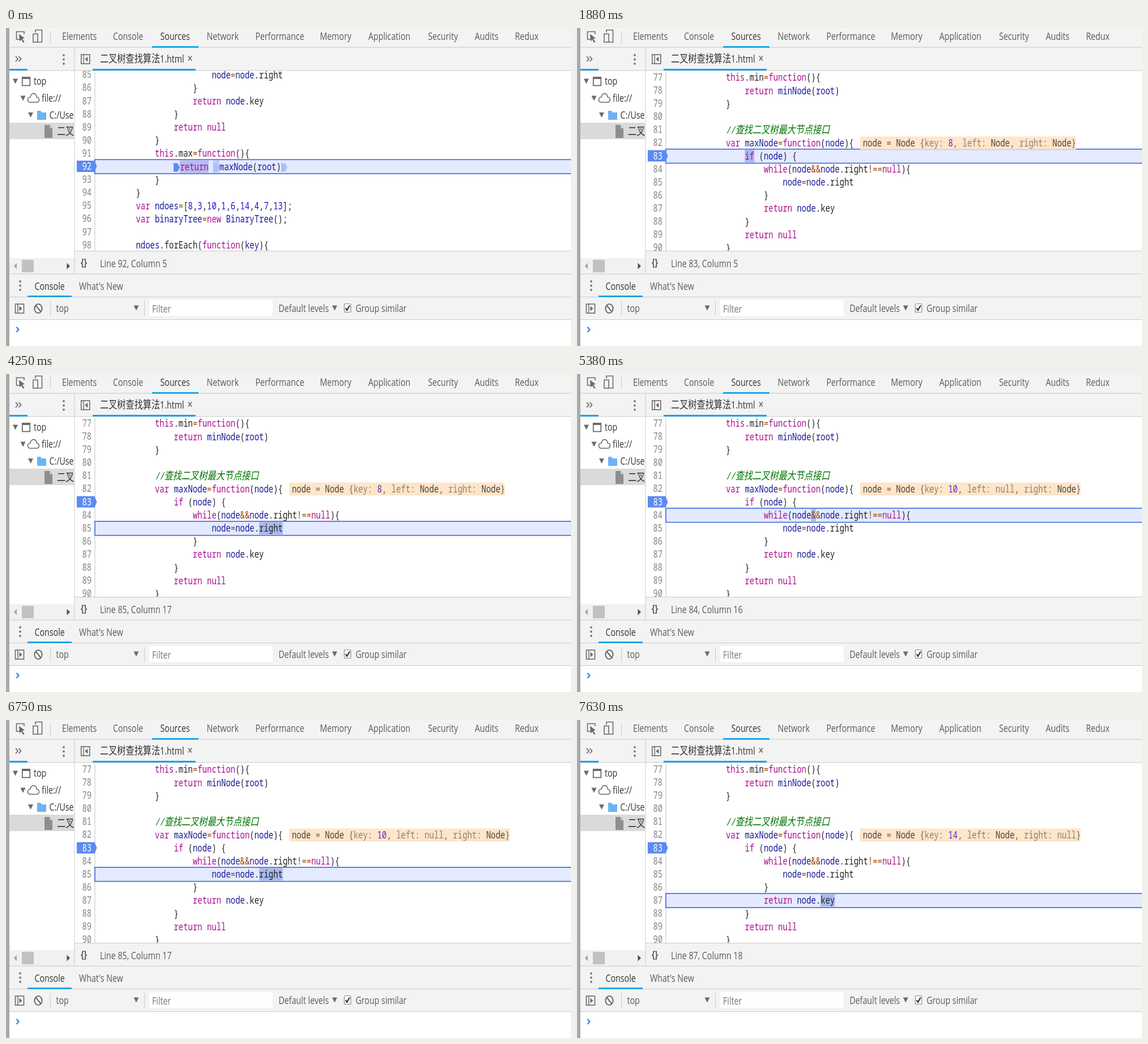
Recreate the animation shown at these times as an HTML page with a canvas. Size 998 by 561 pixels, loop 8000 ms.

```html
<!DOCTYPE html>
<html lang="zh">
<head>
<meta charset="utf-8">
<title>Debugger stepping</title>
<style>
html, body { margin: 0; width: 100%; height: 100%; overflow: hidden; background: #fff; }
canvas { display: block; }
</style>
</head>
<body>
<canvas id="stage" width="998" height="561"></canvas>
<script>
const ctx = document.getElementById('stage').getContext('2d');
const LOOP = 8000;
const ASPECT = 0.79;
const UI = '18px "Open Sans", "Noto Sans", sans-serif';
const CJK = '19.2px "Noto Sans CJK SC", sans-serif';
const MONO = '17.66px "Noto Sans Mono", monospace';
const CHAR = 8.37, ROW = 23.1, CODE_X = 162.5;
const BAR = '#f3f3f3', LINE = '#cacaca', ICON = '#6a6a6a', TEXT = '#5a5a5a';
const ACCENT = '#10a2ee', MARKER = '#5b8bf3', MARKER_PALE = '#a9c1f8';

const FIRST_LINE = 77;
const SOURCE = `            this.min=function(){
                return minNode(root)
            }

            //查找二叉树最大节点接口
            var maxNode=function(node){
                if (node) {
                    while(node&&node.right!==null){
                        node=node.right
                    }
                    return node.key
                }
                return null
            }
            this.max=function(){
                return maxNode(root)
            }
        }
        var ndoes=[8,3,10,1,6,14,4,7,13];
        var binaryTree=new BinaryTree();

        ndoes.forEach(function(key){`.split('\n');

const KEYWORDS = new Set('this function return var if while null new'.split(' '));

// Each step: start, paused line, status column, marked columns, inline value
const atLine92 = { line: 92, column: 5, anchor: 92, anchorY: 244.5, stop: 92 };
const inMax = (line, column, mark, value) =>
  ({ line, column, mark, value, anchor: 83, anchorY: 226, stop: 83 });
const N8 = 'node = Node {key: 8, left: Node, right: Node}';
const N10 = 'node = Node {key: 10, left: null, right: Node}';
const N14 = 'node = Node {key: 14, left: Node, right: null}';
const STEPS = [
  [0, atLine92],
  [1380, { ...atLine92, running: true }],
  [1500, inMax(83, 5, [16, 2])],
  [1630, inMax(83, 5, [16, 2], N8)],
  [3380, inMax(84, 16, [30, 1], N8)],
  [4250, inMax(85, 17, [34, 5], N8)],
  [5380, inMax(84, 16, [30, 1], N10)],
  [6130, inMax(85, 17, [34, 5], N10)],
  [6880, inMax(84, 16, [30, 1], N14)],
  [7630, inMax(87, 18, [32, 3], N14)]
];

function rect(x, y, w, h, color) {
  ctx.fillStyle = color;
  ctx.fillRect(x, y, w, h);
}

function frame(x, y, w, h, color, width = 1.6) {
  ctx.strokeStyle = color;
  ctx.lineWidth = width;
  ctx.strokeRect(x, y, w, h);
}

function path(points, color, stroke, close = true) {
  ctx.beginPath();
  for (let i = 0; i < points.length; i += 2) ctx.lineTo(points[i], points[i + 1]);
  if (close) ctx.closePath();
  if (stroke) {
    ctx.strokeStyle = color;
    ctx.lineWidth = stroke;
    ctx.stroke();
  } else {
    ctx.fillStyle = color;
    ctx.fill();
  }
}

function text(str, x, baseline, color = TEXT, font = UI) {
  ctx.save();
  ctx.translate(x, baseline);
  ctx.scale(ASPECT, 1);
  ctx.font = font;
  ctx.fillStyle = color;
  ctx.fillText(str, 0, 0);
  const width = ctx.measureText(str).width * ASPECT;
  ctx.restore();
  return x + width;
}

function clip(x, y, w, h, draw) {
  ctx.save();
  ctx.beginPath();
  ctx.rect(x, y, w, h);
  ctx.clip();
  draw();
  ctx.restore();
}

function dots(x, y) {
  for (const dy of [-7.5, 0, 7.5]) rect(x - 1.5, y + dy - 1.7, 3, 3.4, ICON);
}

const down = (x, y, color = ICON) => path([x - 4.5, y - 4.5, x + 4.5, y - 4.5, x, y + 4.5], color);

function panelIcon(x, y, dir) {
  frame(x, y, 15, 16, ICON);
  rect(x + 3.6, y, 1.4, 16, ICON);
  const tip = dir > 0 ? 12 : 6.5, back = dir > 0 ? 7 : 11.5;
  path([x + back, y + 3.5, x + back, y + 12.5, x + tip, y + 8], ICON);
}

function drawTopBar() {
  rect(6, 0, 992, 34, BAR);
  rect(6, 33.5, 992, 1.2, LINE);
  path([24, 20, 18.5, 20, 18.5, 6.5, 32, 6.5, 32, 11], ICON, 1.6, false);
  path([23, 10.5, 33, 18, 28.8, 19, 32.5, 24.5, 30.3, 26, 27, 20.5, 24, 23.5], ICON);
  path([52, 8, 52, 3.5, 63.5, 3.5, 63.5, 25, 57, 25], ICON, 1.6, false);
  frame(48, 10.5, 8, 14.5, ICON);
  rect(78, 5, 1, 22, LINE);
  const tabs = [['Elements', 99], ['Console', 189], ['Sources', 272.5], ['Network', 354.5],
    ['Performance', 440.5], ['Memory', 554.5], ['Application', 640], ['Security', 745.5],
    ['Audits', 828], ['Redux', 899]];
  for (const [name, x] of tabs) text(name, x, 21, name === 'Sources' ? '#333' : TEXT);
  rect(258, 32, 82, 2.8, ACCENT);
}

function drawSidebar() {
  rect(6, 35, 115, 40, BAR);
  for (const x of [17, 22.5]) path([x, 50, x + 4, 54.5, x, 59], ICON, 1.8, false);
  dots(102, 55.5);
  rect(6, 74.5, 115, 1, LINE);
  rect(6, 72, 32, 3, ACCENT);
  rect(6, 167, 114, 29, '#dadada');

  clip(6, 76, 114, 330, () => {
    down(16.5, 94);
    frame(28.8, 87, 13.5, 14.5, ICON, 1.8);
    rect(28, 86, 15, 4, ICON);
    text('top', 49, 100, '#333');

    down(30, 124);
    ctx.beginPath();
    ctx.moveTo(43, 131);
    ctx.bezierCurveTo(37, 131, 37, 122, 43, 122);
    ctx.bezierCurveTo(44, 113, 54, 114, 54, 122);
    ctx.bezierCurveTo(60, 122, 60, 131, 54, 131);
    ctx.closePath();
    ctx.strokeStyle = ICON;
    ctx.lineWidth = 1.6;
    ctx.stroke();
    text('file://', 63, 130, '#333');

    down(43.5, 153.5);
    path([55, 146, 61, 146, 63, 149, 71, 149, 71, 162, 55, 162], '#6db2f5');
    text('C:/Use', 76.5, 160, '#333');

    path([68, 171, 77, 171, 82, 177, 82, 194, 68, 194], '#8e8e8e');
    path([77, 171, 82, 177, 77, 177], '#c4c4c4');
    text('二叉树', 90, 189, '#333', CJK);
  });

  rect(6, 406, 115, 28, '#f1f1f1');
  rect(28, 409, 21, 22, '#c1c1c1');
  path([19, 414.5, 19, 425.5, 14, 420], '#a3a3a3');
  path([107.5, 414.5, 107.5, 425.5, 113, 420], '#505050');
}

function drawEditorBars(state) {
  rect(121, 35, 877, 40, BAR);
  rect(121, 74.5, 877, 1, LINE);
  panelIcon(132.8, 47, -1);
  const end = text('二叉树查找算法', 166, 61, '#333', CJK);
  text('1.html', end, 61, '#333');
  path([322, 49.5, 328, 57.5], ICON, 1.5, false);
  path([328, 49.5, 322, 57.5], ICON, 1.5, false);
  rect(153, 72, 182, 3, ACCENT);

  rect(121, 393, 877, 41, BAR);
  rect(121, 393, 877, 1, LINE);
  text('{}', 132, 420, TEXT, 'bold ' + UI);
  text(`Line ${state.line}, Column ${state.column}`, 166, 422);
  rect(120.5, 35, 1, 399, LINE);
}

function tokenColor(token, before) {
  if (/^\d/.test(token)) return '#2a10d8';
  if (KEYWORDS.has(token)) return '#aa0d91';
  if (/^[a-z]/i.test(token)) return before.endsWith('.') ? '#222' : '#1a1a96';
  return /^[=!&]/.test(token) ? '#994500' : '#222';
}

function drawCode(str, x, baseline, shift = () => 0) {
  for (const { 0: token, index } of str.matchAll(/\/\/.*|[a-z]+|\d+|[=!&]+|\S/gi)) {
    const left = x + index * CHAR + shift(index);
    if (token.startsWith('//')) {
      text('//', left, baseline, '#007400', 'italic ' + MONO);
      text(token.slice(2), left + 2 * CHAR, baseline, '#007400', 'italic ' + CJK);
    } else {
      text(token, left, baseline, tokenColor(token, str.slice(0, index)), MONO);
    }
  }
}

function drawValue(str, y) {
  rect(500, y - 11.5, str.length * CHAR + 4.5, 23, '#ffe5ca');
  for (const { 0: token, index } of str.matchAll(/[a-z]+:?|\d+|\S/gi)) {
    let color = '#6b6259';
    if (/:$|null/.test(token)) color = '#8b8177';
    else if (/\d/.test(token)) color = '#5b2fc4';
    else if (/[a-z]/i.test(token)) color = '#4a443f';
    text(token, 505 + index * CHAR, y + 6, color, MONO);
  }
}

function inlineMarker(x, y, color) {
  path([x, y - 6, x + 7, y - 6, x + 11, y + 1.5, x + 7, y + 9, x, y + 9], color);
}

function drawEditor(state) {
  rect(121, 75.5, 877, 317.5, '#fff');
  clip(121, 75.5, 877, 317.5, () => {
    const rowY = line => state.anchorY + (line - state.anchor) * ROW;
    const activeY = rowY(state.line);
    rect(156.5, 76, 1, 317, '#c4c4c4');

    if (!state.running) {
      rect(157, activeY - 12.5, 845, 25, '#e4eaff');
      frame(157, activeY - 12.3, 845, 24.8, '#4570d8', 1.7);
    }
    if (state.mark) {
      const [start, count] = state.mark;
      rect(CODE_X + start * CHAR, activeY - 11, count * CHAR, 22, '#a9b9ee');
    }

    const stopY = rowY(state.stop) - 0.5;
    path([125, stopY - 10, 156.5, stopY - 10, 160.5, stopY, 156.5, stopY + 10, 125, stopY + 10], MARKER);

    SOURCE.forEach((str, i) => {
      const line = FIRST_LINE + i;
      const y = rowY(line);
      text(String(line), 134.5, y + 5.5, line === state.stop ? '#fff' : '#858585', MONO);
      if (line === 92 && state.stop === 92) {
        if (!state.running) {
          rect(307, y - 11, 51, 22, '#b6bbf3');
          rect(365.5, y - 11, 11.5, 22, '#c3ccf7');
        }
        inlineMarker(296, y, MARKER);
        inlineMarker(366, y, MARKER_PALE);
        inlineMarker(486, y, MARKER_PALE);
        drawCode(str, CODE_X, y + 6, index => index < 20 ? 11 : 22);
      } else {
        drawCode(str, CODE_X, y + 6);
      }
    });
    if (state.value) drawValue(state.value, rowY(82));
  });
}

function drawConsole() {
  rect(6, 434, 992, 81, BAR);
  rect(6, 433.5, 992, 1, LINE);
  rect(6, 474, 992, 1, LINE);
  rect(6, 514, 992, 1, LINE);
  dots(25, 454.5);
  text('Console', 50.5, 462, '#333');
  text("What's New", 129, 462);
  rect(38, 472, 78, 2.8, ACCENT);

  panelIcon(16.5, 487, 1);
  ctx.beginPath();
  ctx.ellipse(57, 495, 6.6, 8, 0, 0, 7);
  ctx.strokeStyle = ICON;
  ctx.lineWidth = 2;
  ctx.stroke();
  path([52.5, 489.5, 61.5, 500.5], ICON, 2, false);
  rect(78, 482, 1, 26, LINE);
  text('top', 88.5, 501);
  down(230, 494);
  rect(244, 482, 1, 26, LINE);
  rect(253, 480, 218, 28, '#fff');
  text('Filter', 258, 502, '#777');
  text('Default levels', 481.5, 501);
  down(580.5, 494);
  ctx.beginPath();
  ctx.roundRect(597.5, 486.5, 11.5, 15, 2);
  ctx.fillStyle = '#fff';
  ctx.fill();
  ctx.strokeStyle = '#8c8c8c';
  ctx.lineWidth = 1.2;
  ctx.stroke();
  path([599.8, 494, 602.3, 497.8, 607, 489.5], '#333', 2.2, false);
  text('Group similar', 617.5, 501);
  path([18.5, 527.5, 22.5, 532, 18.5, 536.5], '#3a86e0', 2.3, false);
}

function drawCaretPointer() {
  rect(446.4, 515, 1.4, 26, '#333');
  for (const y of [514, 541]) {
    rect(442, y, 4, 1.5, '#333');
    rect(448, y, 4, 1.5, '#333');
  }
}

function draw() {
  const time = performance.now() % LOOP;
  const state = STEPS.findLast(([start]) => start <= time)[1];
  rect(0, 0, 998, 561, '#fff');
  rect(0, 0, 6, 561, '#a9a9a9');
  drawTopBar();
  drawSidebar();
  drawEditor(state);
  drawEditorBars(state);
  drawConsole();
  if (time >= 250 && time < 380) drawCaretPointer();
  requestAnimationFrame(draw);
}
draw();
</script>
</body>
</html>
```
